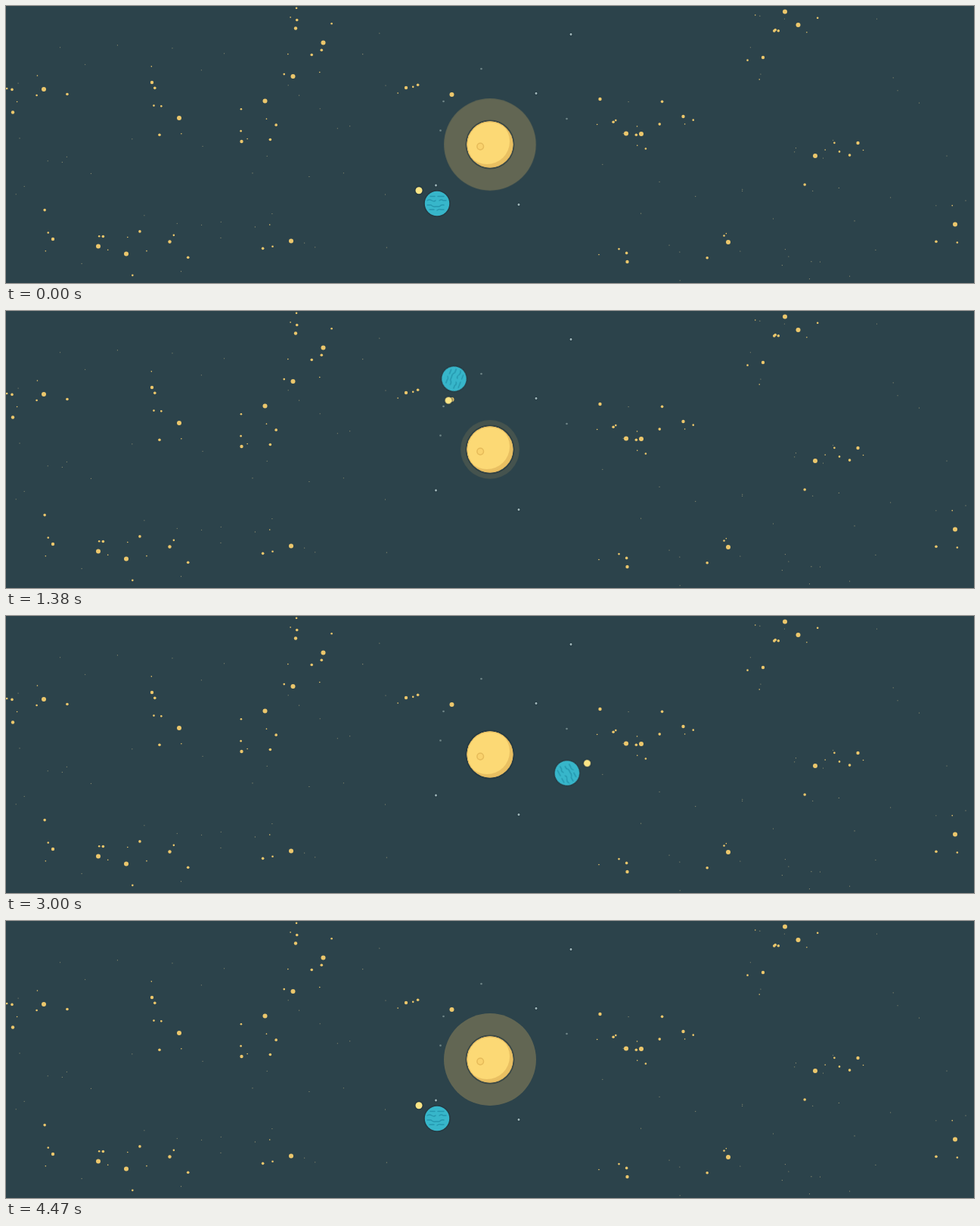
An HTML page that plays this animation: 1280x366 px, repeating every 4500 ms.

```html
<!DOCTYPE html>
<html lang="en">
<head>
<meta charset="utf-8">
<title>Orbit</title>
<style>
  html, body { margin: 0; width: 100%; height: 100%; overflow: hidden; background: #2c434b; }
  svg { display: block; width: 100%; height: 100%; }

  /* one turn in 149 steps, with the last pose held for one more step */
  .orbit, .moon { animation: turn 4500ms steps(149) -4ms infinite; }
  .orbit { --turn: 360deg; }
  .moon { --turn: -720deg; }
  @keyframes turn {
    0% { transform: rotate(0deg); }
    99.333%, 100% { transform: rotate(var(--turn)); }
  }

  .halo { fill: #f5c769; animation: pulse 4500ms linear -4ms infinite; }
  @keyframes pulse {
    0%  { transform: scale(61); opacity: .27; }
    11% { transform: scale(45); opacity: .14; }
    25% { transform: scale(34.5); opacity: .14; animation-timing-function: ease-out; }
    50% { transform: scale(47); opacity: .1; animation-timing-function: ease-in-out; }
    66% { transform: scale(31); opacity: 0; }
    75% { transform: scale(31.5); opacity: .08; }
    99.333%, 100% { transform: scale(61); opacity: .27; }
  }

  .rim { fill: none; stroke: #22343d; stroke-width: 1.6; stroke-opacity: .6; }
  .bands { fill: none; stroke: #2597ae; stroke-width: 1.4; stroke-linecap: round; }
</style>
</head>
<body>
<svg viewBox="0 0 1280 366" preserveAspectRatio="none">
  <defs>
    <clipPath id="disc"><circle r="30.5"/></clipPath>
  </defs>
  <g id="stars"></g>

  <g transform="translate(640 183)">
    <circle class="halo" r="1"/>
    <circle class="rim" r="31.6"/>
    <circle r="30.5" fill="#e9c062"/>
    <circle cx="-4" cy="-4" r="30" fill="#fcd975" clip-path="url(#disc)"/>
    <circle r="30" fill="none" stroke="#e3b95f"/>
    <circle cx="-12.8" cy="2.6" r="4.3" fill="#f9d26d" stroke="#e6bb5a" stroke-width="1.5"/>

    <g class="orbit">
      <g transform="translate(-70 78)">
        <circle class="rim" r="17"/>
        <circle r="16.2" fill="#37b6ca"/>
        <path class="bands" d="M-9 -9.500h6M1 -9.500h8M-13 -4q3 -2 6 0t5 0M3 -4q3 -2 5 0h4M-13 2h5q3 3 6 2h5q3 -3 6 -2M-10 8h6M0 9q3 -2 5 -1h4"/>
        <g class="moon">
          <g transform="translate(-24 -17.3)">
            <circle class="rim" r="5.3"/>
            <circle r="4.5" fill="#fbe586"/>
          </g>
        </g>
      </g>
    </g>
  </g>
</svg>
<script>
  const sky = document.getElementById("stars");
  const gold = "#ecc76c", faint = "#a39d78";

  let seed = 4217;
  const random = (min, max) => {
    seed = seed * 16807 % 2147483647;
    return min + (max - min) * seed / 2147483647;
  };

  function star(x, y, size, color) {
    const dot = document.createElementNS("http://www.w3.org/2000/svg", "circle");
    const look = { cx: x, cy: y, r: size / 2, fill: color };
    for (const name in look) dot.setAttribute(name, look[name]);
    sky.append(dot);
  }

  const nearSun = x => x > 545 && x < 775;

  // smaller stars gather around each bright one
  function cluster(x, y, size) {
    star(x, y, size, gold);
    for (const small of [3.6, 2.6, 1.6]) {
      const angle = random(0, 2 * Math.PI), reach = random(8, 42);
      const sx = x + reach * Math.cos(angle), sy = y + reach * Math.sin(angle);
      if (!nearSun(sx)) star(sx, sy, small, gold);
    }
  }

  const bright = [
    [50, 110], [229, 148], [342.5, 125.5], [379.5, 93], [419.5, 48.5], [122, 317.5], [159, 327.5], [377, 310.5],
    [589.5, 117], [820, 168.5], [840, 169], [1030, 7.5], [1047.5, 25], [1070, 198], [955, 312], [1255, 288.5]
  ];
  const medium = [
    [9, 140.5], [193, 101], [383, 29.5], [311.5, 179], [62, 308], [216.5, 311.5], [529, 108],
    [785.5, 123], [895.5, 146], [1001, 68], [1126.5, 181], [821.5, 338]
  ];
  bright.forEach(([x, y]) => cluster(x, y, 6));
  medium.forEach(([x, y]) => cluster(x, y, 4.4));

  for (let i = 0; i < 100; i++) {
    const x = random(0, 1280), y = random(0, 366);
    if (!nearSun(x)) star(x, y, 1.1, faint);
  }

  for (const [x, y] of [[747, 37.5], [701, 115.5], [568.5, 237], [678, 262.5]]) {
    star(x, y, 5, "#263c45");
    star(x, y, 2.8, "#a3b9bb");
  }
  for (const [x, y] of [[741.5, 149], [628.5, 83], [578.5, 126], [574.5, 164.5]]) star(x, y, 2.6, "#6f8587");
</script>
</body>
</html>
```
